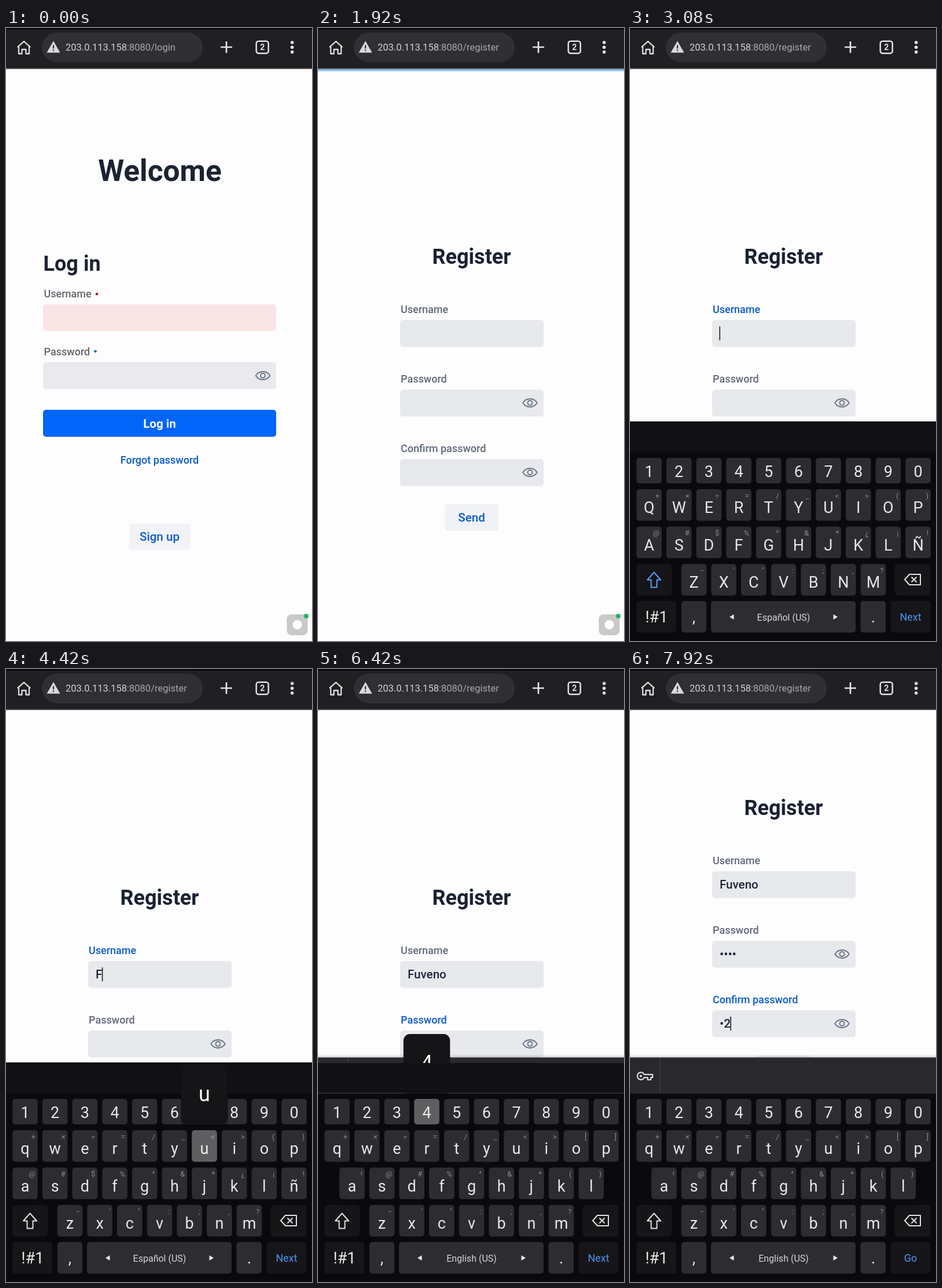
An HTML page for the animation above (8000 ms loop, 529 px wide and 1058 px high).

```html
<!DOCTYPE html>
<html lang="en">
<head>
<meta charset="utf-8">
<title>Sign-up on a phone</title>
<style>
html, body { margin: 0; width: 100%; height: 100%; overflow: hidden; background: #fefdfe; }
svg { display: block; width: 100vw; height: 100vh; font-family: Roboto, "Noto Sans", sans-serif; }
</style>
</head>
<body>
<svg id="stage" viewBox="0 0 529 1058"></svg>
<script>
const LOOP = 8000;
const HOST = "203.0.113.158";
const NAME = "Fuveno";
const BLUE = [11, 91, 200], GREY = [97, 106, 120];
const PITCH = 51.67, FIRST = 33;

const stage = document.getElementById("stage");

function el(tag, attrs, parent, text) {
  const node = document.createElementNS("http://www.w3.org/2000/svg", tag);
  for (const k in attrs) node.setAttribute(k, attrs[k]);
  if (text !== undefined) node.textContent = text;
  parent.appendChild(node);
  return node;
}
const group = parent => el("g", {}, parent);
const box = (parent, x1, y1, x2, y2, fill, r = 0) =>
  el("rect", { x: x1, y: y1, width: x2 - x1, height: y2 - y1, rx: r, fill }, parent);
const label = (parent, text, x, y, size, fill, weight = 400, anchor = "middle") =>
  el("text", { x, y, "font-size": size, fill, "font-weight": weight, "text-anchor": anchor }, parent, text);
const line = (parent, d, stroke, width, fill = "none") =>
  el("path", { d, stroke, "stroke-width": width, fill, "stroke-linejoin": "round" }, parent);
const dot = (parent, cx, cy, r, fill) => el("circle", { cx, cy, r, fill }, parent);

const show = (node, on) => node.setAttribute("display", on ? "inline" : "none");
const clamp = v => Math.max(0, Math.min(1, v));
const ramp = (t, a, b) => clamp((t - a) / (b - a));
const easeOut = p => 1 - Math.pow(1 - p, 3);
const mix = (a, b, p) => `rgb(${a.map((v, i) => Math.round(v + (b[i] - v) * p))})`;

function eye(parent, x, y) {
  const g = el("g", { transform: `translate(${x} ${y})` }, parent);
  line(g, "M-12.3 0C-6.5 -9.3 6.5 -9.3 12.3 0C6.5 9.3 -6.5 9.3 -12.3 0Z", "#6b7684", 1.9);
  line(g, "M-4 0a4 4 0 1 0 8 0a4 4 0 1 0 -8 0", "#6b7684", 2);
}

// Log in page
const page = group(stage);
const login = group(page);
label(login, "Welcome", 266, 263.5, 51.4, "#1b2232", 700);
label(login, "Log in", 64.5, 419, 36, "#1b2232", 700, "start");
label(login, "Username", 65.5, 465, 18, "#66686f", 500, "start");
dot(login, 157, 459, 2.3, "#b3141f");
box(login, 64, 477, 467, 523, "#f9e4e6", 5);
label(login, "Password", 65.5, 564.5, 18, "#66686f", 500, "start");
dot(login, 154.5, 558, 2.3, "#0f62d6");
box(login, 64, 577, 467, 623, "#e9e9ee", 5);
eye(login, 444, 600);
box(login, 64, 659, 467, 705.5, "#0065f8", 5);
label(login, "Log in", 265.5, 689.5, 20.6, "#fff", 700);
label(login, "Forgot password", 265.5, 752, 18, "#0b5bc8", 500);
const signUp = box(login, 213, 855, 319, 901, "#f2f3f6", 5);
label(login, "Sign up", 265.5, 885, 20.6, "#0b5bc8", 500);

// Register page
const register = group(page);
label(register, "Register", 265.5, 407, 36, "#1a2133", 700);
const fields = ["Username", "Password", "Confirm password"].map((name, i) => {
  const y = 504 + 120 * i;
  const title = label(register, name, 143, y - 12.5, 18, "#616a78", 500, "start");
  box(register, 142, y, 390, y + 46.5, "#e7e9ed", 5);
  if (i) eye(register, 366.5, y + 23);
  return { y, title, value: label(register, "", 155, y + 30, 20.6, "#1e2636", 500, "start") };
});
box(register, 219.5, 822, 312, 868, "#f1f2f5", 5);
label(register, "Send", 265.5, 852, 20.6, "#0b5bc8", 500);
const caret = box(register, 0, 0, 1.5, 24, "#111");

// Corner badge
box(page, 485.5, 1012, 521.5, 1048, "#c9c9ca", 8);
dot(page, 503.5, 1030, 8, "#fff");
dot(page, 519, 1015, 4, "#1fb562");

const loadBar = box(stage, 0, 70.5, 529, 74.5, "#8abcf2");

// Browser bar
const top_ = group(stage);
box(top_, 0, 0, 529, 70, "#201f22");
box(top_, 0, 0, 529, 2.5, "#060607");
box(top_, 0, 69.5, 529, 71, "#6c6b6e");
box(top_, 62, 8, 340, 59, "#303033", 25.5);
line(top_, "M22 32V44.5H27.5V37H34.5V44.5H40V32M19.8 33.2L31 23.2L42.2 33.2", "#dcdcde", 2.3);
el("path", { d: "M82 22.5L93.5 42.5H70.5Z", fill: "#dadadc" }, top_);
box(top_, 80.9, 29.5, 83.1, 35.5, "#303033");
box(top_, 80.9, 37.3, 83.1, 39.5, "#303033");
const url = label(top_, "", 103, 39.3, 16.55, "#d3d3d6", 400, "start");
el("tspan", {}, url, HOST);
const path = el("tspan", { fill: "#a9a9ad" }, url);
line(top_, "M381 23V43M371 33H391", "#e2e2e4", 2.7);
el("rect", { x: 432.7, y: 22.7, width: 21, height: 21, rx: 4, fill: "none", stroke: "#e2e2e4", "stroke-width": 2.5 }, top_);
label(top_, "2", 443.2, 38.3, 14, "#e2e2e4", 700);
[25, 33.3, 41.5].forEach(y => dot(top_, 494.7, y, 2.8, "#e2e2e4"));

// Keyboard
const keyboard = group(stage);
box(keyboard, 0, 679, 529, 1058, "#0a090c");
box(keyboard, 0, 679, 529, 733, "#111013");
const strip = group(keyboard);
const fade = el("linearGradient", { id: "fade", x1: 0, y1: 0, x2: 0, y2: 1 }, el("defs", {}, stage));
el("stop", { offset: 0, "stop-opacity": 0 }, fade);
el("stop", { offset: 1, "stop-opacity": 0.18 }, fade);
box(strip, 0, 665, 529, 671, "url(#fade)");
box(strip, 0, 670.5, 529, 733, "#29282c");
box(strip, 51.5, 671, 52.5, 733, "#454449");
line(strip, "M12.8 702.5a6 6 0 0 1 11.5 -2.7H39V705.2H36V709H30.5V705.2H24.3a6 6 0 0 1 -11.5 -2.7Z", "#dcdcde", 2.2);
dot(strip, 18.7, 702.5, 2.1, "#dcdcde");

const ROWS = [742, 796, 860.5, 925, 989];
const INK = "#e8e8ea", KEY = "#2d2c30", DARK = "#161518";

function keyRow(parent, row, chars, x0, hints) {
  [...chars].forEach((c, i) => {
    const x = x0 + PITCH * i, y = ROWS[row], h = row ? 54.5 : 44;
    box(parent, x - 21.8, y, x + 21.8, y + h, KEY, 5);
    label(parent, c, x, y + (row ? 41 : 32.7), 27, INK);
    if (hints) label(parent, hints[i], x + 18, y + 15.5, 13, "#8c8b90", 400, "end");
  });
}
const R4 = FIRST + PITCH * 1.5;
const SIGNS = "−'\":;,?";
function layout(upper, spanish) {
  const g = group(keyboard), as = s => upper ? s.toUpperCase() : s;
  keyRow(g, 1, as("qwertyuiop"), FIRST, spanish ? "+×÷=/_<>()" : "+×÷=/_<>[]");
  if (spanish) keyRow(g, 2, as("asdfghjklñ"), FIRST, "@#$%^&*¿¡!");
  else keyRow(g, 2, "asdfghjkl", FIRST + PITCH / 2, "!@#%^&*()");
  keyRow(g, 3, as("zxcvbnm"), R4, SIGNS);
  line(g, "M41.5 939.5L53 952.5H46.5V965.5H36.5V952.5H30Z", upper ? "#5a9ff8" : "#e2e2e4", 2);
  label(g, spanish ? "Español (US)" : "English (US)", 265.5, 1022.5, 16, "#d6d6d9");
  return g;
}
keyRow(keyboard, 0, "1234567890", FIRST);
[[11, 72, 3, DARK], [458, 519.5, 3, DARK], [11, 80, 4, DARK], [89, 132, 4, KEY],
 [140, 390, 4, KEY], [398.5, 442, 4, KEY], [450.5, 519.5, 4, DARK]]
  .forEach(([a, b, row, fill]) => box(keyboard, a, ROWS[row], b, ROWS[row] + 54.5, fill, 5));
line(keyboard, "M483 943H502V961H483L475 952Z", "#e2e2e4", 2);
line(keyboard, "M486.5 947.5L495.5 956.5M495.5 947.5L486.5 956.5", "#e2e2e4", 2);
label(keyboard, "!#1", 46, 1026, 27, INK);
label(keyboard, ",", 110.5, 1026, 27, INK);
label(keyboard, ".", 420.5, 1026, 27, INK);
el("path", { d: "M172 1016.5L179.5 1012V1021ZM359 1016.5L351.5 1012V1021Z", fill: INK }, keyboard);
const action = label(keyboard, "Next", 485, 1023, 18, "#4b94f0");
const layouts = [layout(true, true), layout(false, true), layout(false, false)];
const glow = box(keyboard, 0, 0, 43.6, 44, "#fff", 5);
glow.setAttribute("fill-opacity", 0.24);

// Enlarged key preview
const preview = group(stage);
box(preview, -41, 0, 41, 106, "#000", 13).setAttribute("fill-opacity", 0.25);
box(preview, -40, 0, 40, 103, "#151417", 11);
const glyph = label(preview, "", 0, 62, 36, "#fff");
const cover = box(stage, 0, 680, 529, 731, "#111013");

// Presses: [character, down, up, field]
const nameDown = [4075, 4330, 4500, 4670, 4830, 5075];
const presses = [
  ...[...NAME].map((c, i) => [c, nameDown[i], nameDown[i] + 100, 0]),
  ["1", 5825, 5960, 1], ["2", 6160, 6250, 1], ["3", 6270, 6360, 1], ["4", 6380, 6500, 1],
  ["1", 7490, 7600, 2], ["2", 7820, 7905, 2]
];
const focusAt = [2070, 5415, 7070];
const ENGLISH = 5500;

function keyPos(c, english) {
  const k = c.toLowerCase();
  const rows = ["1234567890", "qwertyuiop", "asdfghjklñ", "zxcvbnm"];
  const row = rows.findIndex(r => r.includes(k));
  const x0 = row === 3 ? R4 : row === 2 && english ? FIRST + PITCH / 2 : FIRST;
  return { x: x0 + PITCH * rows[row].indexOf(k), y: ROWS[row], h: row ? 54.5 : 44 };
}

function drawForm(t) {
  const focused = focusAt.filter(f => t >= f).length - 1;
  fields.forEach((f, i) => {
    const typed = presses.filter(p => p[3] === i && t >= p[2]);
    let text = typed.map(p => p[0]).join("");
    if (i && text) text = "•".repeat(text.length - 1) + (focused === i ? text.slice(-1) : "•");
    f.value.textContent = text;
    const on = ramp(t, focusAt[i], focusAt[i] + 200);
    const off = i < 2 ? ramp(t, focusAt[i + 1], focusAt[i + 1] + 200) : 0;
    f.title.setAttribute("fill", mix(GREY, BLUE, on - off));
    if (i === focused) {
      const last = typed.length ? typed[typed.length - 1][2] : focusAt[i];
      caret.setAttribute("x", 154.5 + (text ? f.value.getComputedTextLength() : 0));
      caret.setAttribute("y", f.y + 11);
      show(caret, (t - last) % 1000 < 500);
    }
  });
  if (focused < 0) show(caret, false);
}

function drawKeys(t) {
  const rise = easeOut(ramp(t, 2250, 2600));
  show(keyboard, rise > 0);
  keyboard.setAttribute("transform", `translate(0 ${(1 - rise) * 380})`);
  const mode = t < presses[0][2] ? 0 : t < ENGLISH ? 1 : 2;
  layouts.forEach((g, i) => show(g, i === mode));
  action.textContent = t < 7250 ? "Next" : "Go";
  show(strip, t >= 6375);
  show(cover, t >= 6375 && t < 6490);

  const hit = presses.find(p => t >= p[1] && t < p[2]);
  const next = (t >= 5290 && t < 5400) || (t >= 6985 && t < 7070);
  show(preview, !!hit);
  show(glow, !!hit || next);
  const k = hit ? keyPos(hit[0], t >= ENGLISH) : { x: 485, y: ROWS[4], h: 54.5 };
  const w = hit ? 43.6 : 69;
  const at = { x: k.x - w / 2, y: k.y, width: w, height: k.h };
  for (const a in at) glow.setAttribute(a, at[a]);
  if (hit) {
    glyph.textContent = hit[0];
    preview.setAttribute("transform", `translate(${Math.max(51, Math.min(478, k.x))} ${k.y - 112})`);
  }
}

function draw(t) {
  const opened = t >= 580;
  show(login, !opened);
  show(register, opened);
  signUp.setAttribute("fill", t >= 80 && t < 330 ? "#e6e9ef" : "#f2f3f6");
  path.textContent = ":8080/" + (t < 500 ? "login" : "register");

  const width = 0.4 * ramp(t, 1250, 1750) + 0.6 * ramp(t, 1750, 1890);
  loadBar.setAttribute("width", 529 * width);
  loadBar.setAttribute("opacity", 1 - ramp(t, 1930, 2200));

  page.setAttribute("transform", `translate(0 ${-155 * easeOut(ramp(t, 7040, 7160))})`);
  drawForm(t);
  drawKeys(t);
}

const start = performance.now();
function tick() {
  draw((performance.now() - start) % LOOP);
  requestAnimationFrame(tick);
}
tick();
</script>
</body>
</html>
```
